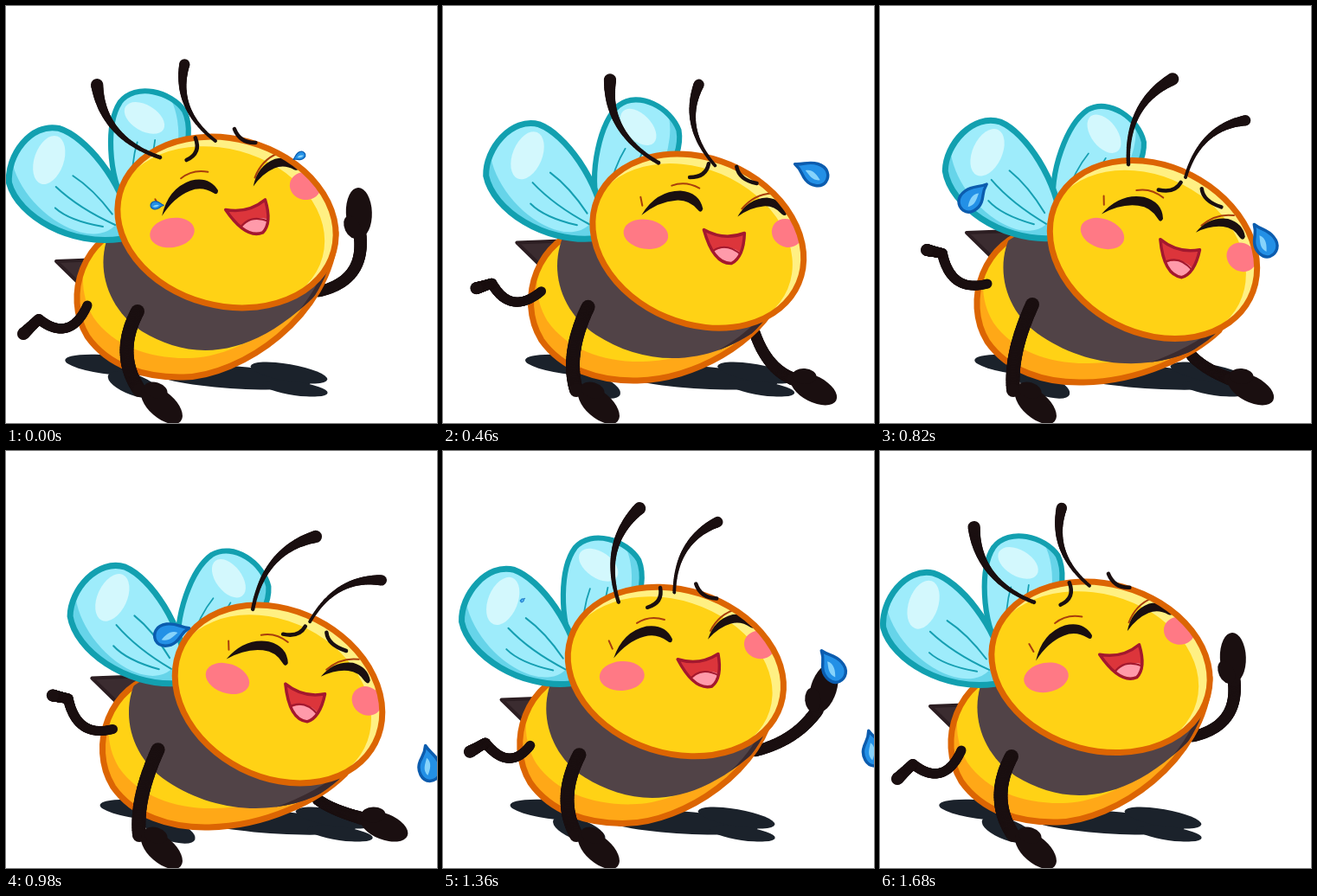
Write an HTML page with a canvas that moves like this. It is 498 px wide and 482 px high and loops after 1700 ms.

```html
<!DOCTYPE html>
<html lang="en">
<head>
<meta charset="utf-8">
<title>Laughing bee</title>
<style>
html, body { margin: 0; width: 100%; height: 100%; overflow: hidden; background: #fff; }
canvas { display: block; }
</style>
</head>
<body>
<canvas id="stage" width="498" height="482"></canvas>
<script>
const g = document.getElementById('stage').getContext('2d');
const LOOP = 1700, TAU = Math.PI * 2, RAD = Math.PI / 180;
const BLACK = '#1a0f10', ORANGE = '#dc6503', YELLOW = '#ffd215', TEAL = '#12a0b0';

const wingPath = new Path2D('M0-9C40-50 110-60 142-35C163-12 164 36 134 50C104 61 40 46 0 10Z');
const veins = new Path2D('M15 0Q60-10 96-6M25-10Q60-28 82-26M25 8Q60 18 88 16');
const dropPath = new Path2D('M-18-4C-9-6-6-11 4-11C15-11 19-3 17 4C14 12 3 12-3 8C-9 4-9 0-18-4Z');
const dropShine = new Path2D('M-6-1C0 3 4 7 11 4C7 0 0-5-6-1Z');
const mouth = new Path2D('M67-5Q90 8 114-1Q113 27 99 34Q78 35 67-5Z');
const eyes = new Path2D('M-5-22Q12-50 40-50Q62-48 66-29Q64-23 60-28Q50-40 35-39Q15-38-5-22Z' +
  'M106-20Q118-41 140-42Q158-40 163-25Q162-19 157-23Q148-33 136-32Q121-31 106-20Z');
const creases = new Path2D('M-6-43Q-5-38-4-33M30-56Q46-62 62-53M111-29Q125-46 146-47');

// Launch time and upward push of each tear
const leftTears = [[0, 25], [130, 110], [550, 120], [850, 90], [1040, 185]];
const rightTears = [[0, 110], [330, 70], [770, -60], [1110, -15], [1220, 0]];

const lerp = (a, b, u) => a + (b - a) * u;
const mix = (a, b, u) => a.map((v, i) => lerp(v, b[i], u));
const bez = (a, b, c, u) => lerp(lerp(a, b, u), lerp(b, c, u), u);
const wave = (t, peak) => Math.cos(TAU * (t - peak) / LOOP);

function ease(t, from = 0, to = 1) {
  const u = Math.min(1, Math.max(0, (t - from) / (to - from)));
  return u * u * (3 - 2 * u);
}

// 0 = thrown back, 1 = bent forward
const lean = t => ease((1 + wave(t, 830)) / 2);
const slap = t => ease(t, 60, 420) * (1 - ease(t, 900, 1520));
const bob = t => 3 * wave(t, LOOP / 4) * (1 - lean(t));
const facePose = t => {
  const [x, y, deg] = mix([192, 262, -19], [257, 263, 10], lean(t));
  return [x, y + bob(t), deg];
};

function at(x, y, deg, scale, draw) {
  g.save();
  g.translate(x, y);
  g.rotate(deg * RAD);
  g.scale(scale, scale);
  draw();
  g.restore();
}

function oval(x, y, rx, ry, deg, color) {
  g.beginPath();
  g.ellipse(x, y, rx, ry, deg * RAD, 0, TAU);
  if (color) { g.fillStyle = color; g.fill(); }
}

function fill(color, path) { g.fillStyle = color; g.fill(path); }

function line(color, width, path) {
  g.strokeStyle = color;
  g.lineWidth = width;
  g.stroke(path);
}

// Rounded limb whose radius runs from r0 to r1
function limb([x0, y0, x1, y1, x2, y2], r0, r1) {
  for (let i = 0; i <= 60; i++) {
    const u = i / 60, r = lerp(r0, r1, u * u);
    oval(bez(x0, x1, x2, u), bez(y0, y1, y2, u), r, r, 0, BLACK);
  }
}

function mitten(x, y, deg) {
  at(x, y, deg, 1, () => {
    oval(2, 1, 29, 15, 3, BLACK);
    oval(-14, -8, 14, 9, -20, BLACK);
  });
}

function wing([x, y, deg], flip, scale) {
  at(x, y, flip ? -deg : 180 + deg, scale, () => {
    if (flip) g.scale(1, -1);
    fill('#66d4e9', wingPath);
    g.save();
    g.clip(wingPath);
    oval(92, 9, 78, 46, 8, '#9eecfb');
    oval(121, 14, 17, 29, -18, '#d3f8fd');
    g.restore();
    line('#159fb2', 2, veins);
    line(TEAL, 7, wingPath);
  });
}

function drawShadow(p) {
  const [l, r] = mix([68, 372], [109, 425], p), c = '#1b222b';
  oval(l + 55, 415, 55, 11, 6, c);
  oval(l + 80, 438, 32, 12, 20, c);
  oval((l + r) / 2 + 40, 429, (r - l) / 2 - 60, 13, 4, c);
  oval(r - 45, 424, 45, 10, 10, c);
  oval(r - 38, 442, 38, 8, 8, c);
}

function drawArm(t) {
  const s = slap(t), deg = lerp(-95, 24, s);
  const x = bez(407, 520, 427, s), y = bez(241, 350, 441, s);
  const shoulder = mix([361, 330], [360, 404], lean(t)), elbow = mix([415, 318], [375, 420], s);
  const wrist = [x - 24 * Math.cos(deg * RAD), y - 24 * Math.sin(deg * RAD)];
  limb([...shoulder, ...elbow, ...wrist], 6.5, 7.5);
  mitten(x, y, deg);
}

function drawBody(p) {
  const bx = 30 * p, by = 6 * p;
  const [cx, cy, ex, ey] = mix([375, 360, 384, 262], [360, 405, 395, 375], p);
  const shift = (...q) => q.map((v, i) => v + (i % 2 ? by : bx));
  const middle = mix([255, 250], [316, 281], p);
  const [sx, sy] = mix([58, 295], [100, 262], p);
  const spike = new Path2D(`M${sx} ${sy}l52-2l-8 45Z`);
  fill('#3b2c30', spike);
  line('#2c1e22', 4, spike);

  const shell = new Path2D();
  shell.moveTo(...shift(150, 252));
  shell.bezierCurveTo(...shift(90, 263, 65, 335, 94, 382));
  shell.bezierCurveTo(...shift(118, 416, 160, 430, 205, 429));
  shell.bezierCurveTo(270 + bx, 428 + by, cx, cy, ex - 3, ey);
  shell.lineTo(...middle);
  const band = new Path2D();
  band.moveTo(...shift(126, 250));
  band.bezierCurveTo(...shift(100, 290, 112, 347, 157, 376));
  band.bezierCurveTo(215 + bx, 411 + by * 1.6, 290 + bx, 414 + by * 1.6, (cx + ex) / 2, (cy + ey) / 2);
  band.lineTo(ex + 5, ey - 10);
  band.lineTo(...middle);
  band.closePath();
  const edge = new Path2D();
  edge.moveTo(...shift(260, 421));
  edge.quadraticCurveTo(cx, cy, ex, ey);

  fill('#ffa817', shell);
  g.save();
  g.clip(shell);
  g.translate(7, -22);
  fill(YELLOW, shell);
  g.restore();
  line(ORANGE, 7, shell);
  g.save();
  g.clip(shell);
  fill('#514347', band);
  g.clip(band);
  line('#3a2b2f', 14, edge);
  g.restore();
}

function drawFace(t) {
  at(...facePose(t), 1, () => {
    oval(0, 0, 26, 17, 9, '#ff7985');
    oval(163, -1, 18, 16, 30, '#ff7985');
    line('#a83e0c', 2, creases);
    fill(BLACK, eyes);
    fill('#dc353b', mouth);
    g.save();
    g.clip(mouth);
    oval(92, 28, 19, 12, -5, '#ff9aaa');
    line('#a3182e', 2, new Path2D('M73 23Q90 7 110 24'));
    g.restore();
    line('#a3182e', 3.5, mouth);
  });
}

function drawBrows(t) {
  const brow = (back, front) => {
    const [x0, y0, x1, y1, x2, y2] = mix(back, front, lean(t));
    line(BLACK, 4.5, new Path2D(`M${x0} ${y0}Q${x1} ${y1} ${x2} ${y2}`));
  };
  at(...facePose(t), 1, () => {
    brow([61, -95, 62, -76, 43, -74], [79, -74, 74, -60, 55, -61]);
    brow([107, -90, 108, -72, 125, -67], [104, -71, 108, -57, 130, -54]);
  });
}

function drawHead(t) {
  const [x, y0, deg, rx] = mix([255, 250, 15, 128], [316, 281.5, 27, 125], lean(t));
  const y = y0 + bob(t), ry = 96.5 - Math.abs(bob(t));
  g.save();
  oval(x, y, rx, ry, deg, '#fff083');
  g.clip();
  oval(x - 9, y + 8, rx - 4, ry - 3, deg, YELLOW);
  drawFace(t);
  g.restore();
  oval(x, y, rx, ry, deg);
  g.strokeStyle = ORANGE;
  g.lineWidth = 7;
  g.stroke();
  drawBrows(t);
}

function drawFeelers(t) {
  const p = lean(t), swing = -5 + 47 * wave(t, 1040);
  const feeler = (back, front, deg, scale) => {
    const [x, y] = mix(back, front, p);
    at(x, y + bob(t), deg, scale, () => limb([0, 0, -35, -60, 0, -111], 2.3, 7.2));
  };
  feeler([178, 175], [287, 183], swing, 1);
  feeler([242, 156], [353, 198], swing + 19, .86);
}

function drawLegs(t) {
  const kick = lean(t - 40);
  const hip = mix([94, 346], [124, 321], lean(t)), thigh = mix([74, 390], [82, 332], kick);
  const knee = mix([38, 362], [72, 286], kick), toe = mix([20, 379], [54, 282], kick);
  limb([...hip, ...thigh, ...knee], 5.5, 6);
  limb([...knee, ...mix(knee, toe, .5), ...toe], 6, 7);
  const [sx, sy] = mix([152, 353], [176, 345], lean(t));
  limb([sx, sy, sx - 26, 402, 154, 444], 8, 8);
  mitten(179, 459, 38);
}

// A tear leaves the outer corner of its eye and falls in an arc
function drawTear(t, [start, push], side) {
  const u = (t - start) / 300;
  if (u < 0 || u > 1.1) return;
  const [fx, fy, deg] = facePose(start), c = Math.cos(deg * RAD), s = Math.sin(deg * RAD);
  const ex = side < 0 ? -6 : 167, ey = -35;
  const speed = side * (side < 0 ? 150 : 145 - 60 * lean(start)), fall = 125;
  const x = fx + ex * c - ey * s + speed * u;
  const y = fy + ex * s + ey * c - push * u + fall * u * u;
  const size = 1.15 * Math.min(1, .35 + u * 4, (1.1 - u) * 5);
  at(x, y, Math.atan2(2 * fall * u - push, speed) / RAD, size, () => {
    g.scale(1, side);
    fill('#2390e6', dropPath);
    fill('#86d3fb', dropShine);
    line('#0b5cae', 3, dropPath);
  });
}

function draw(t) {
  const p = lean(t);
  g.clearRect(0, 0, 498, 482);
  g.lineCap = g.lineJoin = 'round';
  drawShadow(p);
  wing(mix([148, 236, 77 - bob(t)], [208, 242, 55], p), true, .88);
  drawArm(t);
  drawBody(p);
  wing(mix([138, 262, 37 - bob(t)], [203, 262, 43], p), false, 1);
  drawHead(t);
  drawFeelers(t);
  drawLegs(t);
  leftTears.forEach(tear => drawTear(t, tear, -1));
  rightTears.forEach(tear => drawTear(t, tear, 1));
}

function tick() {
  draw(performance.now() % LOOP);
  requestAnimationFrame(tick);
}
tick();
</script>
</body>
</html>
```
